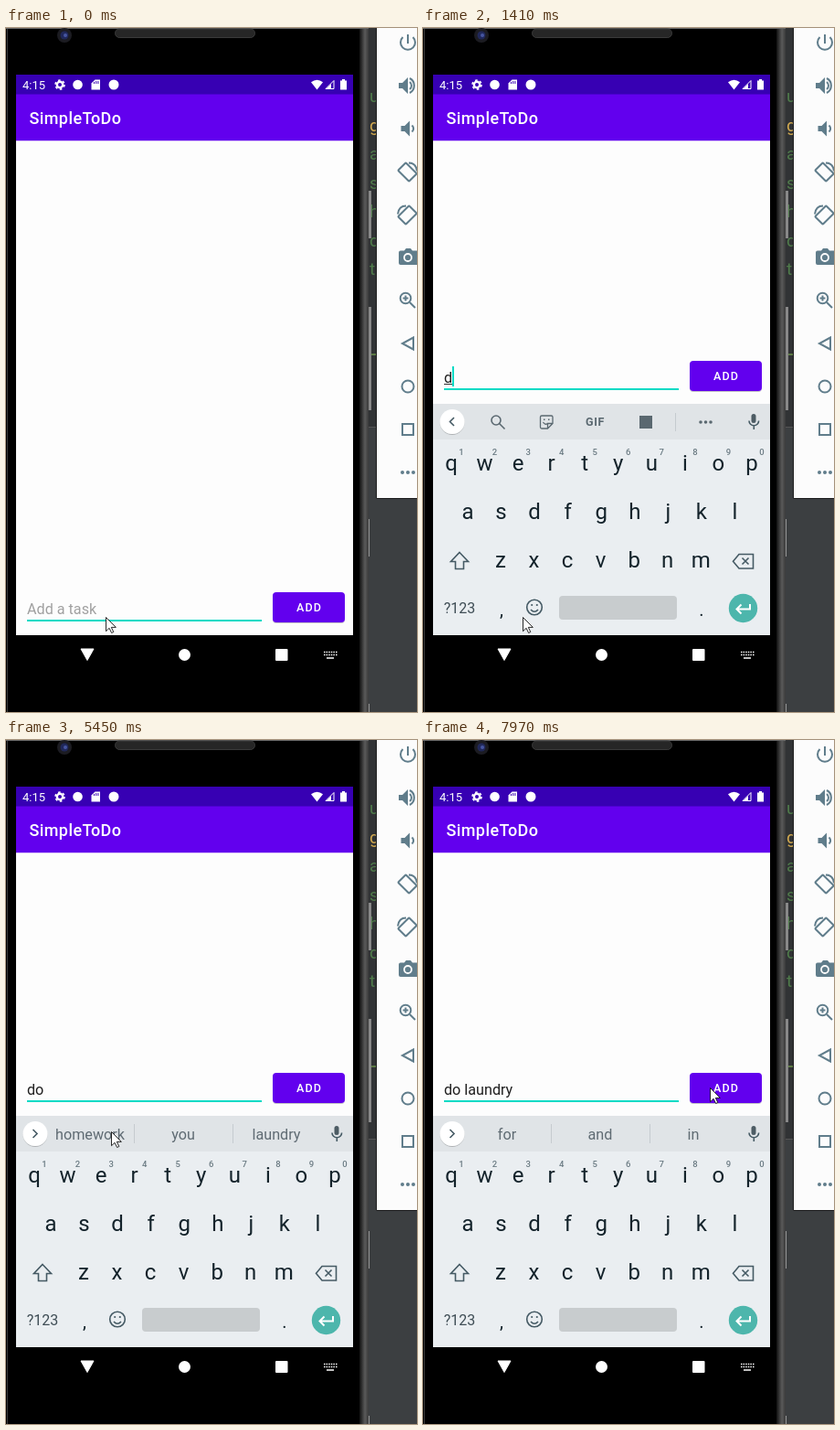
An HTML page for the animation above (8000 ms loop, 450x748 px).

```html
<!DOCTYPE html>
<html lang="en">
<head>
<meta charset="utf-8">
<title>To-do app demo</title>
<style>
  html, body { margin: 0; width: 100%; height: 100%; overflow: hidden; background: #313335; }
  svg { display: block; font-family: Roboto, sans-serif; }
  .mid { text-anchor: middle; }
  .line { fill: none; stroke: #455a64; stroke-width: 1.6; }
  #tools { fill: #607d8b; }
  #tools .line { stroke: #607d8b; stroke-width: 2; }
  #field { font-size: 16.16px; }
  #letters { font-size: 24px; fill: #14232b; }
  #digits { font-size: 9.5px; font-weight: 500; fill: #6b7b83; }
  #suggestions { font-size: 16.2px; fill: #5f6b73; }
</style>
</head>
<body>
<svg width="450" height="748" viewBox="0 0 450 748">
  <defs>
    <linearGradient id="bezel">
      <stop offset="0" stop-color="#111"/><stop offset=".6" stop-color="#5a5a5a"/><stop offset="1" stop-color="#3a3a3a"/>
    </linearGradient>
    <filter id="shadow" x="-20%" y="-20%" width="140%" height="150%">
      <feDropShadow dx="0" dy="1" stdDeviation=".7" flood-opacity=".22"/>
    </filter>
  </defs>

  <!-- Editor behind the phone -->
  <path d="M397 436h53v312h-53z" fill="#3c3f41"/>
  <path d="M397 436.500h9" stroke="#555"/>
  <g id="code" font-size="19" fill="#4f7a4a"></g>
  <path d="M399 357h6" stroke="#5d7a45" stroke-width="2"/>

  <!-- Phone body -->
  <path d="M0 0h397v748H0z" fill="#000"/>
  <path d="M1.500 0v748" stroke="#3a3a3a"/>
  <path d="M0 .5h397" stroke="#666"/>
  <path d="M387 1h10v747h-10z" fill="url(#bezel)"/>
  <path d="M398.500 178v52M398.500 305v113" stroke="#888" stroke-width="3"/>
  <path d="M397.500 537v41M397.500 739v9" stroke="#999"/>
  <circle cx="64" cy="8" r="8" fill="#1c1c22"/>
  <circle cx="64" cy="8" r="4.500" fill="#20285a"/>
  <circle cx="65" cy="8" r="2" fill="#4656a0"/>
  <rect x="119.500" y="1" width="153" height="9.500" rx="4.700" fill="#262626" stroke="#3a3a3a"/>

  <!-- App -->
  <path d="M11 51h369v613H11z" fill="#fdfdfd"/>
  <path d="M11 51h369v22H11z" fill="#3700b3"/>
  <path d="M11 72.500h369v50.700H11z" fill="#6200ee"/>
  <g fill="#fff">
    <text x="18" y="67" font-size="13">4:15</text>
    <circle cx="59" cy="62" r="3.200" fill="none" stroke="#fff" stroke-width="2.400"/>
    <circle cx="59" cy="62" r="5" fill="none" stroke="#fff" stroke-width="1.600" stroke-dasharray="2.600 2.636"/>
    <circle cx="78.500" cy="62" r="5.300"/>
    <path d="M97.500 56.500h5.500v11h-9.500V60.500z"/>
    <path d="M96.500 59v2M98.700 58v3M100.900 58v3" stroke="#3700b3"/>
    <circle cx="118" cy="62" r="5.500"/>
    <path d="M340.500 67.500L334 59.200q6.500-5 13 0z"/>
    <path d="M350 66.500l9-9v9z" fill="none" stroke="#fff"/>
    <path d="M350 67l6-6v6z"/>
    <path d="M366 57.500h2v-1.500h3v1.500h2v10h-7z"/>
    <text x="25.500" y="105" font-size="18" font-weight="500" letter-spacing=".400">SimpleToDo</text>
  </g>

  <g id="row">
    <text id="hint" x="23" y="388" font-size="16.160" fill="#a0a0a0">Add a task</text>
    <text id="field" x="23" y="388" fill="#1f1f1f"></text>
    <rect id="underline" x="23" y="389" height="1" fill="#333"/>
    <path d="M23 395h257" stroke="#03dac5" stroke-width="2"/>
    <rect id="caret" y="370" width="2" height="22" fill="#03dac5"/>
    <rect x="292" y="364" width="79" height="33" rx="4" fill="#6200ee" filter="url(#shadow)"/>
    <text class="mid" x="332" y="385" font-size="12.570" font-weight="500" letter-spacing="1.120" fill="#fff">ADD</text>
  </g>

  <g id="keyboard">
    <path d="M11 411h369v253H11z" fill="#eaeef1"/>
    <path d="M11 411h369v39H11z" fill="#e0e4e7"/>
    <circle cx="32" cy="430.500" r="13.500" fill="#fff" filter="url(#shadow)"/>
    <path id="chevron" class="line"/>
    <g id="toolbar" fill="#5a6870">
      <g class="line" style="stroke:#5a6870">
        <circle cx="80" cy="429" r="5"/><path d="M83.500 432.500l6 6"/>
        <path stroke-width="1.300" d="M130 424h10.500q1.500 0 1.500 1.500v7l-5.500 5.500H130q-1.500 0-1.500-1.500v-11q0-1.500 1.500-1.500zM142 432.500h-5.500v5.500M131.500 431q2 3.500 5 1.500"/>
      </g>
      <path d="M132 427.500h1.500v1.500h-1.500zM137 427.500h1.500v1.500h-1.500z"/>
      <text class="mid" x="188.500" y="435" font-size="12.500" font-weight="700" letter-spacing=".600">GIF</text>
      <rect x="237" y="424" width="14" height="14"/>
      <path d="M276.500 421v20" stroke="#c5cbcf"/>
      <circle cx="304" cy="431" r="1.800"/><circle cx="309.500" cy="431" r="1.800"/><circle cx="315" cy="431" r="1.800"/>
    </g>
    <g id="suggestions">
      <path d="M140.500 420v21M248.500 420v21" stroke="#c5cbcf"/>
      <text class="mid" x="92" y="437"></text>
      <text class="mid" x="194" y="437"></text>
      <text class="mid" x="296" y="437"></text>
    </g>
    <rect x="359.500" y="422" width="5" height="10" rx="2.500" fill="#4d5c64"/>
    <path class="line" d="M357 429.500a5.300 5.300 0 0 0 10.600 0M362.300 435v4"/>
    <g id="letters" class="mid"></g>
    <g id="digits" class="mid"></g>
    <g class="line">
      <path d="M40 573.500l9.500 10h-5v8h-9v-8h-5z"/>
      <path d="M346 575.500h15.500v15.500h-15.500l-6.500-7.750zM349.500 579.500l7 7M356.500 579.500l-7 7"/>
      <circle cx="122" cy="633.500" r="8.300"/>
      <path d="M118 636q4 4.500 8 0"/>
    </g>
    <circle cx="119.200" cy="631" r="1.100" fill="#455a64"/><circle cx="124.800" cy="631" r="1.100" fill="#455a64"/>
    <text class="mid" x="40" y="640" font-size="16" fill="#3f4d55">?123</text>
    <g class="mid" font-size="20" fill="#14232b">
      <text x="86" y="642.500">,</text><text x="305" y="642.500">.</text>
    </g>
    <rect x="149" y="621" width="129" height="26" rx="4" fill="#c8ccce"/>
    <circle cx="350.500" cy="634.500" r="15.700" fill="#4db6ac"/>
    <path d="M358 630v5.500h-14.500m5-5l-5 5 5 5" fill="none" stroke="#fff" stroke-width="2"/>
  </g>

  <!-- Navigation bar -->
  <g fill="#fff">
    <path d="M82 679h14l-7 12.500z" stroke="#fff" stroke-linejoin="round"/>
    <circle cx="195.500" cy="685.500" r="6.500"/>
    <rect x="295" y="679" width="13.500" height="13" rx="1"/>
    <path d="M348 682.500h14.500M348 685.500h14.500" stroke="#fff" stroke-width="1.500" stroke-dasharray="1.500 1.100"/>
    <path d="M351 689h8" stroke="#fff" stroke-width="1.500"/>
  </g>

  <!-- Emulator controls -->
  <path d="M405.500-1H451v515.500h-45.500z" fill="#fcfcfc" stroke="#1c1c1c"/>
  <g id="tools">
    <g class="line">
      <path d="M440 7v10M434.500 10a8 8 0 1 0 11 0"/>
      <path d="M442 59a5 5 0 0 1 0 8M442 55a9 9 0 0 1 0 16"/>
      <path d="M444.500 106.500a4.500 4.500 0 0 1 0 7"/>
      <g id="rotate">
        <rect x="433.500" y="149" width="12" height="17" rx="1" transform="rotate(-45 439.500 157.500)"/>
        <path d="M441 147.500q8 0 9 9"/>
      </g>
      <use href="#rotate" transform="translate(879 47) scale(-1 1)"/>
      <circle cx="437.500" cy="295.500" r="5.800"/>
      <path d="M442 300l6 6M434.500 295.500h6M437.500 292.500v6"/>
      <path d="M446 338.500v13l-12-6.500z"/>
      <circle cx="440" cy="392" r="6.500"/>
      <path d="M434 433h12v12h-12z"/>
    </g>
    <path d="M430 60h4l6-6v18l-6-6h-4zM432.500 107h4l5.500-5.500v17l-5.500-5.500h-4z"/>
    <path d="M432 243.500h4l2-2.500h5l2 2.500h5v15.500h-18q-2 0-2-2v-11.500q0-2 2-2z"/>
    <circle cx="440" cy="251" r="4" fill="none" stroke="#fcfcfc" stroke-width="1.800"/>
    <circle cx="434" cy="486" r="2"/><circle cx="440" cy="486" r="2"/><circle cx="446" cy="486" r="2"/>
  </g>

  <path id="mouse" d="M.5.500v15.200l3.600-3.400 2.500 5.200 2.200-1-2.500-5.100h5z" fill="#fff" stroke="#111" stroke-width=".900"/>
</svg>

<script>
const $ = id => document.getElementById(id);
const label = (x, y, s) => `<text x="${x}" y="${y}">${s}</text>`;
const keys = (s, x, y) => [...s].map((c, i) => label(x + i * 36.55, y, c)).join('');

$('code').innerHTML = [...'ugashdt'].map((c, i) =>
  `<text x="398" y="${81 + i * 31.5}"${c === 'g' ? ' fill="#d0a850"' : ''}>${c}</text>`).join('');
$('letters').innerHTML = keys('qwertyuiop', 31, 484) + keys('asdfghjkl', 49, 537) + keys('zxcvbnm', 85, 590);
$('digits').innerHTML = keys('1234567890', 42, 467);

// Each entry: start time, then the values held from that time on
const typed = [[0, '', 23], [1410, 'd', 32], [1660, 'do', 41], [4010, 'do', 45], [7450, 'do laundry', 98]];
const strips = [[0], [2300, 'do', "don't", 'does'], [4010, 'homework', 'you', 'laundry'], [7450, 'for', 'and', 'in']];
const blinks = [260, 640, 1170, 2160, 2553, 3080, 3500, 4390, 4920, 5450, 5870, 6410, 6920, 7970];
const moves = [
  [0, 109, 644], [1920, 118, 640], [2040, 146, 622], [2160, 147, 599],
  [2300, 140, 556], [2427, 128, 500], [2553, 113, 442], [2680, 106, 415], [2820, 104, 410],
  [2960, 118, 470], [3080, 139, 550], [3240, 137, 495], [3360, 131, 446], [3500, 115, 428],
  [5620, 116, 428], [5745, 119, 429], [5870, 125, 430], [6290, 184, 430], [6410, 344, 429],
  [6560, 385, 425], [6680, 378, 424], [6800, 362, 424], [6920, 345, 425], [7040, 325, 427],
  [7160, 309, 428], [7300, 280, 427], [7700, 283, 423], [7820, 286, 418], [7970, 314, 380]
];
const at = (list, t) => list.findLast(entry => entry[0] <= t);
const show = (id, on) => $(id).setAttribute('visibility', on ? 'visible' : 'hidden');
const place = (id, x, y) => $(id).setAttribute('transform', `translate(${x} ${y})`);

function draw() {
  const t = performance.now() % 8000;
  const [, text, caretX] = at(typed, t);
  const [, ...words] = at(strips, t);
  const [, mouseX, mouseY] = at(moves, t);

  place('row', 0, t < 520 ? 253 : 0);
  $('field').textContent = text;
  show('hint', !text);
  $('underline').setAttribute('width', t < 4010 ? caretX - 23 : 0);
  $('caret').setAttribute('x', caretX);
  show('caret', blinks.filter(b => b <= t).length % 2);

  $('keyboard').style.display = t < 1290 ? 'none' : '';
  place('keyboard', 0, t < 1410 ? 23 : 0);
  show('toolbar', !words.length);
  show('suggestions', words.length);
  $('suggestions').querySelectorAll('text').forEach((el, i) => el.textContent = words[i] || '');
  $('chevron').setAttribute('d', words.length ? 'M29.500 426l4.500 4.500-4.500 4.500' : 'M34 426l-4.500 4.500 4.500 4.500');

  place('mouse', mouseX, mouseY);
  requestAnimationFrame(draw);
}
draw();
</script>
</body>
</html>
```
